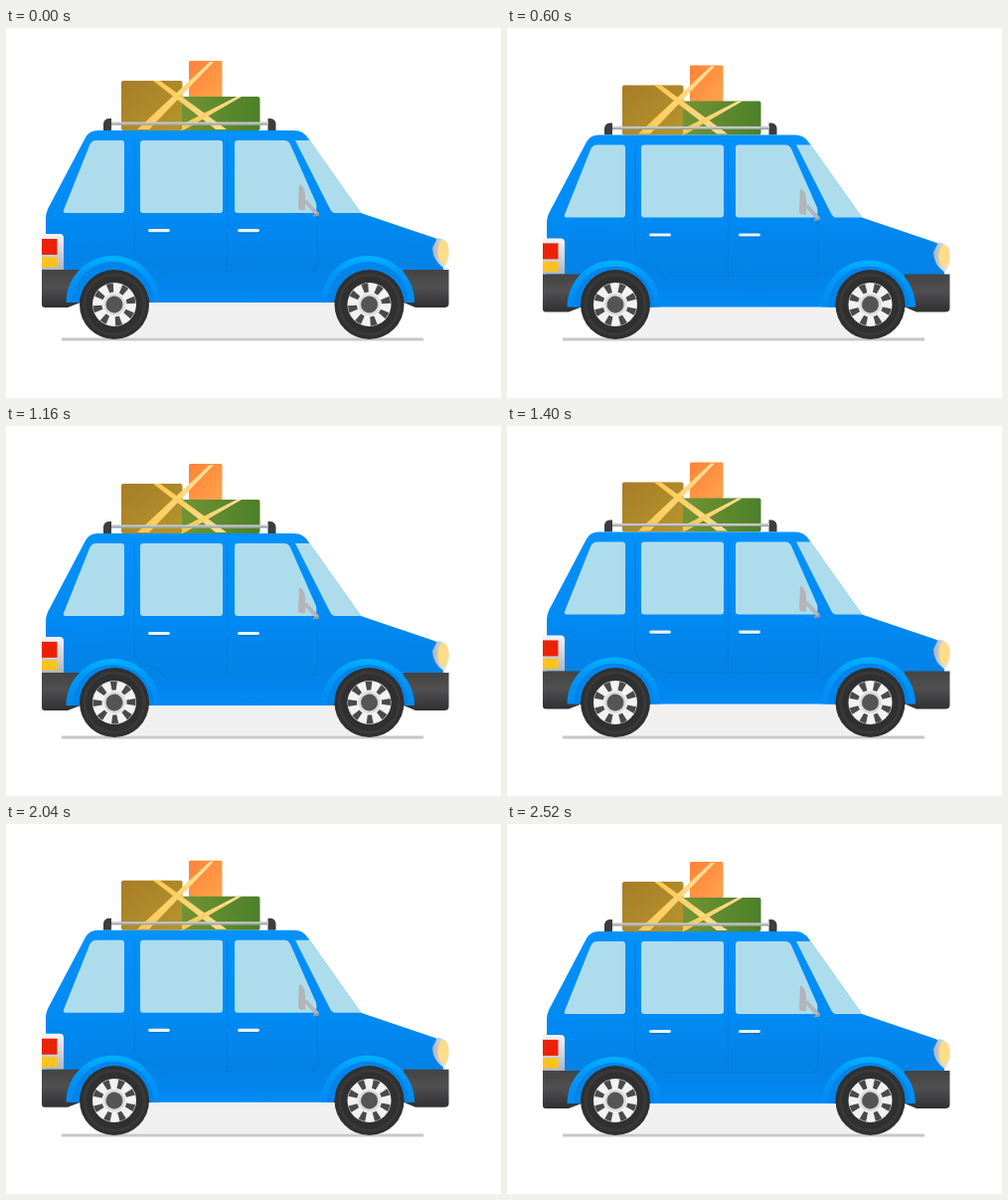
An HTML page for the animation above (2.56 s loop, 498 px wide and 372 px high).

```html
<!DOCTYPE html>
<html lang="en">
<head>
<meta charset="utf-8">
<title>Loaded car</title>
<style>
  html, body { margin: 0; width: 100%; height: 100%; overflow: hidden; background: #fff; }
  svg { display: block; width: 498px; height: 372px; }
</style>
</head>
<body>
<svg viewBox="0 0 498 372">
  <defs>
    <linearGradient id="paint" gradientUnits="userSpaceOnUse" x1="0" y1="103" x2="0" y2="276">
      <stop offset="0" stop-color="#0692fb"/>
      <stop offset=".5" stop-color="#008af3"/>
      <stop offset=".8" stop-color="#0482e6"/>
      <stop offset="1" stop-color="#008af4"/>
    </linearGradient>
    <linearGradient id="flare" x2="0" y2="1">
      <stop stop-color="#00b2ff"/><stop offset=".35" stop-color="#0098fa"/><stop offset="1" stop-color="#008af2"/>
    </linearGradient>
    <linearGradient id="rubber" x2="0" y2="1">
      <stop stop-color="#444"/><stop offset=".45" stop-color="#505052"/><stop offset="1" stop-color="#303032"/>
    </linearGradient>
    <linearGradient id="brown" x2="1" y2="1">
      <stop stop-color="#a87c28"/><stop offset="1" stop-color="#b4962c"/>
    </linearGradient>
    <linearGradient id="orange" x2="1" y2="1">
      <stop stop-color="#ff8238"/><stop offset="1" stop-color="#ffa44c"/>
    </linearGradient>
    <linearGradient id="green" x2="1" y2="0">
      <stop stop-color="#729333"/><stop offset="1" stop-color="#4c8029"/>
    </linearGradient>
    <linearGradient id="ribbon" x2="1" y2="0">
      <stop stop-color="#ffc84c"/><stop offset="1" stop-color="#ffe09c"/>
    </linearGradient>
    <linearGradient id="panel" x2="0" y2="1">
      <stop stop-color="#f4f5f7"/><stop offset="1" stop-color="#aeb6bf"/>
    </linearGradient>
    <linearGradient id="chrome" x2="1" y2="0">
      <stop stop-color="#a9b4bd"/><stop offset="1" stop-color="#f2f3f4"/>
    </linearGradient>
    <g id="rim">
      <circle r="22" fill="#f2f2f2"/>
      <circle r="17" fill="none" stroke="#4a4a4a" stroke-width="9" pathLength="8" stroke-dasharray=".42 .58"/>
      <circle r="11" fill="#dcdcdc"/>
      <circle r="8.5" fill="#555"/>
    </g>
    <g id="handle">
      <rect width="22" height="4.5" rx="2" fill="#0074cf"/>
      <rect width="22" height="3.2" rx="1.6" fill="#e6f6fc"/>
    </g>
  </defs>

  <path d="M140 270H332L352 311H118Z" fill="#f0f0f1"/>
  <rect x="56" y="311.5" width="364" height="3" fill="#c8c8c8"/>

  <g id="body">
    <rect x="116" y="53" width="61.500" height="50" rx="2" fill="url(#brown)"/>
    <rect x="184" y="33" width="33.500" height="37" rx="1.500" fill="url(#orange)"/>
    <rect x="177" y="69" width="78.500" height="34" rx="2" fill="url(#green)"/>
    <g fill="url(#ribbon)">
      <path d="M205 34H209L144 102H132Z"/>
      <path d="M148 53H155L222 102H211Z"/>
      <path d="M232 69H237L180 102H177V97Z"/>
    </g>
    <path d="M98 103V96Q99 91 104 91H106V103ZM271.500 103V96Q270.500 91 265.500 91H263.500V103Z" fill="#3c3d40"/>
    <rect x="106" y="94.500" width="158" height="3" fill="#c5c8c8"/>
    <rect x="106" y="96.500" width="158" height="1" fill="#8f9594"/>

    <path d="M92 103H290Q299 103 304 111L357 186L431 211Q440 214 440 223V250H400V276H60V250H40V191Q40 187 42 182L80 110Q84 103 92 103Z" fill="url(#paint)"/>

    <g fill="#addded">
      <path d="M91 113H116Q119 113 119 116V183Q119 186 116 186H60Q57 186 58 183L84 118Q86 113 91 113Z"/>
      <rect x="135" y="113" width="83" height="73" rx="3"/>
      <path d="M233 113H280Q284 113 286 117L312 176Q314 186 308 186H233Q230 186 230 183V116Q230 113 233 113Z"/>
      <path d="M291 113H305.500L357 186H331Q328 186 326 182Z"/>
    </g>
    <path d="M129 113V222Q130 233 143 236Q155 239 161 250M222.500 113V246M313 190V235Q313 242 308 246M161 245H313" fill="none" stroke="#0079d6" stroke-width="1" opacity=".6"/>
    <use href="#handle" x="143" y="202"/>
    <use href="#handle" x="233" y="202"/>

    <path d="M295 157Q301 160 301 168V183H297Q294 183 294 179Z" fill="#b4b3b8"/>
    <path d="M302 175L313 187" stroke="#b3b6bc" stroke-width="4" stroke-linecap="round"/>
    <path d="M309 189L315 187" stroke="#9599a0" stroke-width="2"/>

    <path d="M36 207H54Q58 207 58 211V243H36Z" fill="url(#panel)"/>
    <rect x="36" y="212" width="15.500" height="16" fill="#ec2208"/>
    <rect x="36" y="230.500" width="15.500" height="10" fill="#ffc31c"/>
    <path d="M434 211Q446 212 446 225Q446 237 440 241Q429 233 429 221Z" fill="url(#chrome)"/>
    <ellipse cx="440" cy="225" rx="5.500" ry="11.500" fill="#ffdc86"/>

    <path d="M36 243H75V276L62 281H39Q36 281 36 278ZM400 243H445.500V277Q445.500 281 441 281H412L400 276Z" fill="url(#rubber)"/>
    <g id="arches"></g>
  </g>
  <g id="wheels"></g>
</svg>
<script>
  const LOOP = 2560, SPIN = 1280, BOB = 680, DROP = 600;
  const byId = id => document.getElementById(id);
  const wheelX = [109, 365.5];

  byId('arches').innerHTML = wheelX.map(x => `
    <g transform="translate(${x - 1.5} 276)">
      <path d="M-47 0A47 47 0 0 1 47 0Z" fill="url(#flare)"/>
      <path d="M-41 0A41 41 0 0 1 41 0Z" fill="#0084ea"/>
      <path d="M-34 0A36 36 0 0 1 37 0Z" fill="#353538"/>
    </g>`).join('');

  byId('wheels').innerHTML = wheelX.map(x => `
    <g transform="translate(${x} 278)">
      <circle r="35" fill="#303030"/>
      <circle r="30" fill="none" stroke="#393939" stroke-width="3"/>
      <use class="rim" href="#rim"/>
    </g>`).join('');
  const rims = document.querySelectorAll('.rim');

  // The body sinks onto its springs, then bobs gently.
  function bodyOffset(t) {
    const p = Math.min(t / DROP, 1);
    const settle = p * p * (3 - 2 * p);
    return settle * (4 + 0.9 * Math.cos(2 * Math.PI * (t - 1160) / BOB));
  }

  function draw() {
    const t = performance.now() % LOOP;
    byId('body').setAttribute('transform', `translate(0 ${bodyOffset(t).toFixed(2)})`);
    rims.forEach(rim => rim.setAttribute('transform', `rotate(${360 * t / SPIN + 22.5})`));
    requestAnimationFrame(draw);
  }
  draw();
</script>
</body>
</html>
```
